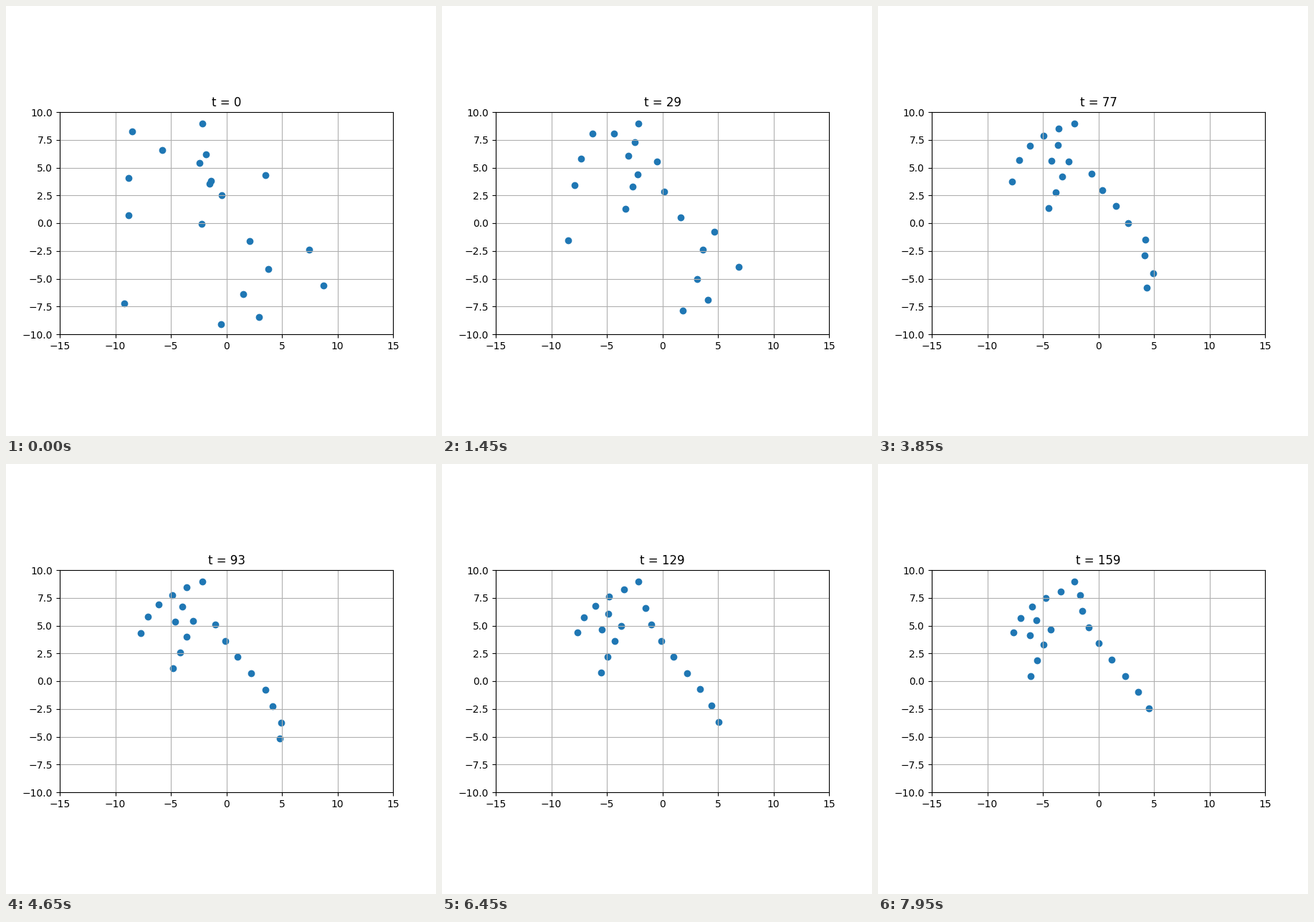
Animation of 600x600 px, one loop 8 s. Source, as a matplotlib script:

```python
import numpy as np
import matplotlib.pyplot as plt
from matplotlib.animation import FuncAnimation

FRAMES, INTERVAL = 160, 50
LEADER = np.array([274, 164])   # stage pixels, as all positions below

# Where the birds of each wing start, front to back.
LEFT = [(218, 201), (176, 175), (171, 240), (171, 292), (165, 415)]
PAIR = [(279, 207), (270, 219)]
INNER = [(362, 236), (286, 244), (284, 248), (273, 304)]
RIGHT = [(301, 264), (340, 328), (423, 340), (366, 367),
         (443, 390), (331, 402), (353, 434), (300, 444)]


def left_slot(j, t):
    """Steps of equal length along a bending arc, the front sinking slowly."""
    k = np.arange(j + 1)
    turn = np.radians(24 + 2.6 * k ** 2)
    arc = 23 * np.array([-np.cos(turn).sum(), np.sin(turn).sum()])
    return LEADER + arc + np.array([0.04, 0.09]) * (1 - j / 5) * (t - 108)


def line_slot(origin, drift):
    """Straight slanted file that drifts at constant speed."""
    def slot(j, t):
        gap = np.array([-9.3, 21.7])
        return np.array(origin) + np.array(drift) * (t - 108) + gap * j
    return slot


def right_slot(j, t):
    """File moving up an S-shaped track, one place every 36 steps."""
    s = j + (82 - t) / 36
    return np.array([338 + 56 * np.sin(0.34 * (s - 2.5)), 231 + 22.6 * s])


# Starts, slot rule, settling time of the front bird, extra time per place.
WINGS = [
    (LEFT, left_slot, 66, 9),
    (PAIR, line_slot((240, 203), (-0.37, 0.29)), 60, 0),
    (INNER, line_slot((256.5, 222), (-0.31, 0.17)), 60, 0),
    (RIGHT, right_slot, 60, 13),
]


def positions(t):
    """Each bird eases from its start into its moving slot."""
    pts = [LEADER]
    for starts, slot, settle, extra in WINGS:
        for j, start in enumerate(starts):
            left = max(0, 1 - t / (settle + extra * j)) ** 2
            pts.append(slot(j, t) + (start - slot(j, 0)) * left)
    return (np.array(pts) - (307.5, 303)) / (15.5, -15.5)


fig, ax = plt.subplots(figsize=(6, 6), dpi=100)
ax.set_aspect("equal")
ax.set_xlim(-15, 15)
ax.set_ylim(-10, 10)
ax.grid(True)
dots = ax.scatter(*positions(0).T, color="#1f77b4")
title = ax.set_title("t = 0")


def update(t):
    dots.set_offsets(positions(t))
    title.set_text(f"t = {t}")
    return dots, title


anim = FuncAnimation(fig, update, frames=FRAMES, interval=INTERVAL,
                     repeat=True, repeat_delay=0, blit=False)
plt.show()
```
